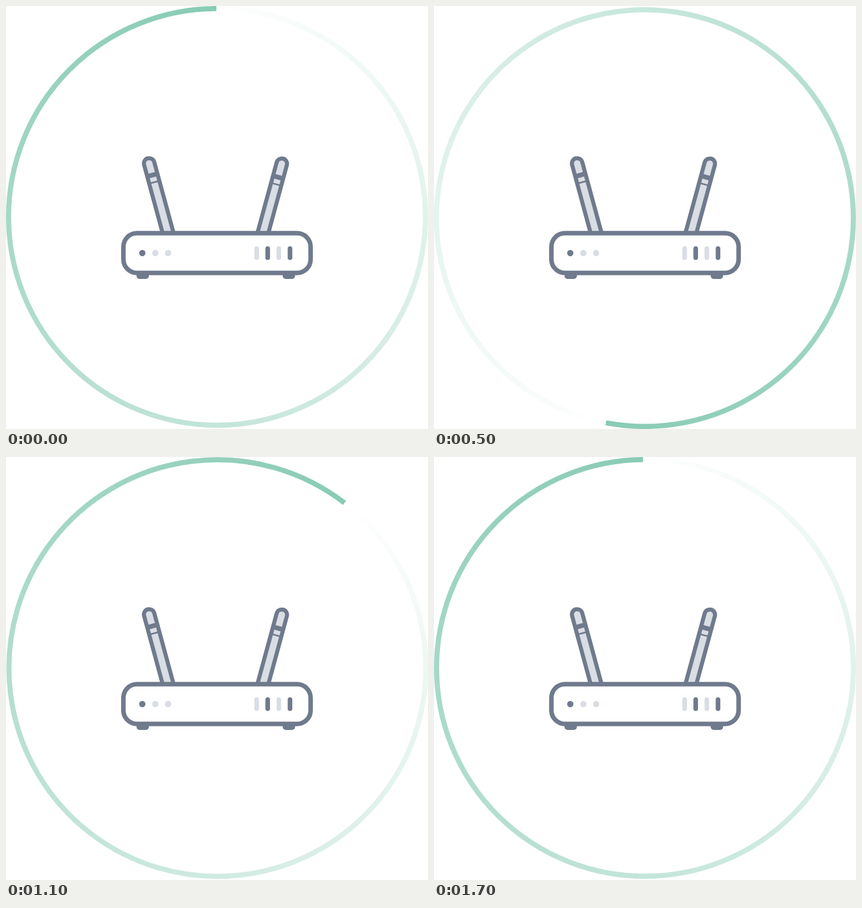
An HTML page with a canvas that plays this animation: 700 by 702 pixels, repeating every 1800 ms.

```html
<!DOCTYPE html>
<html lang="en">
<head>
<meta charset="utf-8">
<title>Router loading ring</title>
<style>
  html, body { margin: 0; width: 100%; height: 100%; overflow: hidden; background: #fff; }
  canvas, svg { position: absolute; left: 0; top: 0; width: 700px; height: 702px; }
  .dark { fill: #6f7a8c; }
  .light { fill: #d9dde4; }
  .line { stroke: #6f7a8c; }
</style>
</head>
<body>
<canvas id="ring" width="700" height="702"></canvas>
<svg viewBox="0 0 700 702">
  <defs>
    <g id="rod">
      <path class="light line" stroke-width="6.7" d="M-8.75 122V0a8.75 8.75 0 0 1 17.5 0V122"/>
    </g>
    <g id="bands" class="dark">
      <rect x="-8" y="16.2" width="16" height="7.8"/>
      <rect x="-8" y="31" width="16" height="2.6"/>
    </g>
    <rect id="foot" class="dark" y="436" width="20.5" height="17" rx="5"/>
    <rect id="bar" x="-3.8" y="398.8" width="7.6" height="22.8" rx="3.8"/>
    <circle id="led" cy="410" r="5.2"/>
  </defs>
  <g transform="translate(237.5 261.3) rotate(-15.2)">
    <use href="#rod"/>
    <use href="#bands"/>
  </g>
  <g transform="translate(457.4 261.8) rotate(15.2)">
    <use href="#rod"/>
    <use href="#bands" y="3"/>
  </g>
  <use href="#foot" x="216.5"/>
  <use href="#foot" x="459"/>
  <rect class="line" fill="#fff" stroke-width="7.5" x="194.75" y="377" width="310.5" height="66" rx="22.5"/>
  <use href="#led" class="dark" x="226.1"/>
  <use href="#led" class="light" x="247.7"/>
  <use href="#led" class="light" x="268.9"/>
  <use href="#bar" class="light" x="415.8"/>
  <use href="#bar" class="dark" x="434.1"/>
  <use href="#bar" class="light" x="452.5"/>
  <use href="#bar" class="dark" x="471.1"/>
</svg>
<script>
  const LOOP = 1800, STEP = 100, TURN = 361;
  const ctx = document.getElementById('ring').getContext('2d');
  const rad = deg => deg * Math.PI / 180;

  // cubic-bezier(.25, .1, .25, 1), solved by bisection
  function ease(x) {
    let lo = 0, hi = 1;
    for (let i = 0; i < 30; i++) {
      const s = (lo + hi) / 2;
      if (0.75 * s * (1 - s) + s ** 3 < x) lo = s; else hi = s;
    }
    const s = (lo + hi) / 2;
    return 0.3 * s * (1 - s) ** 2 + 3 * s * s * (1 - s) + s ** 3;
  }

  // Fades out counterclockwise behind the head, which sits at the top
  const head = rad(-90.16);
  const fade = ctx.createConicGradient(head, 0, -1);
  fade.addColorStop(0, 'rgba(136,203,181,0)');
  fade.addColorStop(1, 'rgba(136,203,181,1)');

  function draw(ms) {
    const t = Math.floor((ms % LOOP) / STEP) * STEP;
    ctx.clearRect(0, 0, 700, 702);
    ctx.save();
    // The pivot is one pixel below the ring's centre, so the ring wobbles
    ctx.translate(350, 351);
    ctx.rotate(rad(-TURN * ease(t / LOOP)));
    ctx.strokeStyle = fade;
    ctx.lineWidth = 8.5;
    ctx.beginPath();
    ctx.arc(0, -1, 345.75, head + rad(0.3), head + rad(360));
    ctx.stroke();
    ctx.restore();
  }

  let start;
  function tick(now) {
    if (start === undefined) start = now;
    draw(now - start);
    requestAnimationFrame(tick);
  }
  draw(0);
  requestAnimationFrame(tick);
</script>
</body>
</html>
```
